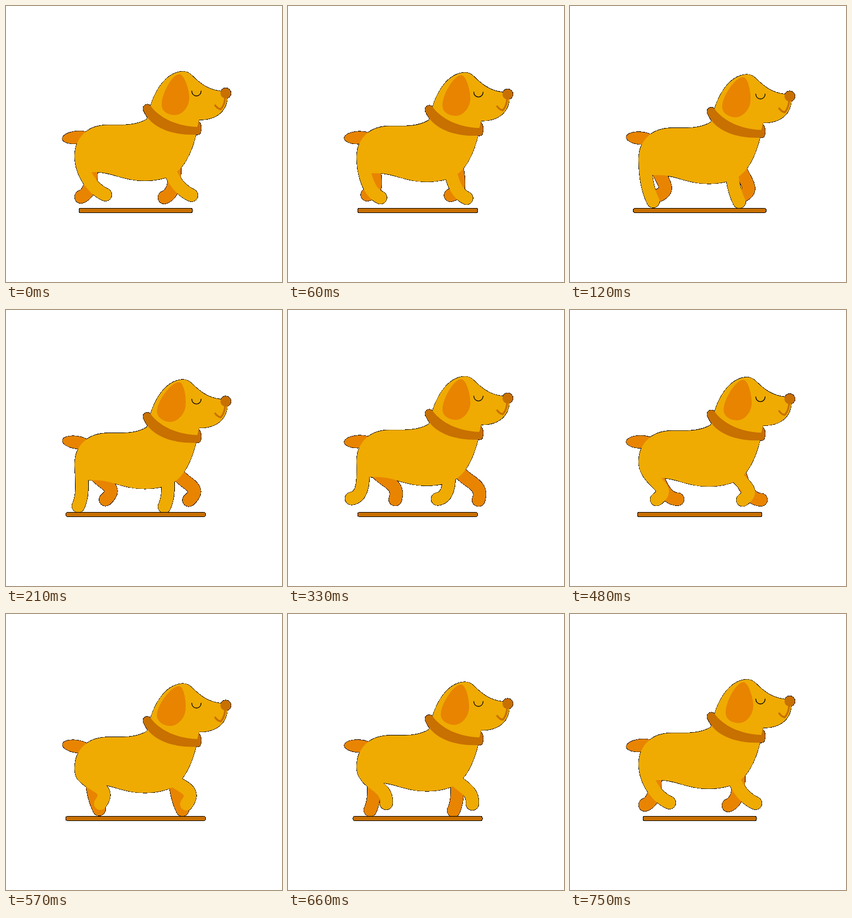
Write an HTML page that moves like this. It is 500 px wide and 500 px high and loops after 780 ms.

```html
<!DOCTYPE html>
<html lang="en">
<head>
<meta charset="utf-8">
<title>Walking dog</title>
<style>
  html, body { margin: 0; width: 100%; height: 100%; overflow: hidden; background: #fff; }
  svg { display: block; width: 100%; height: 100%; }
</style>
</head>
<body>
<svg id="stage" viewBox="0 0 500 500" fill="none" stroke-linecap="round" stroke-linejoin="round"></svg>
<script>
const STEP = 30, FRAMES = 26, CYCLE = 25;
const GOLD = '#efab02', ORANGE = '#e88400', BROWN = '#c87000', INK = '#000';
const EDGE = 0.7, LEG = 23;

const stage = document.getElementById('stage');

function set(el, attrs) {
  for (const k in attrs) el.setAttribute(k, attrs[k]);
  return el;
}

function add(parent, tag, attrs) {
  const el = document.createElementNS('http://www.w3.org/2000/svg', tag);
  parent.appendChild(el);
  return set(el, attrs);
}

// Dark copies lie under all the fills, so only the outer contour shows.
const edges = add(stage, 'g', { stroke: INK, fill: INK, 'shape-rendering': 'crispEdges' });
const fills = add(stage, 'g', {});

const solid = (tag, color, attrs) => [
  add(edges, tag, { ...attrs, 'stroke-width': 2 * EDGE }),
  add(fills, tag, { ...attrs, fill: color })
];

const tube = (color, width) => [
  add(edges, 'path', { fill: 'none', 'stroke-width': width + 2 * EDGE }),
  add(fills, 'path', { stroke: color, 'stroke-width': width })
];

const line = (width, color, d) => add(fills, 'path', { d, stroke: color, 'stroke-width': width });
const update = (els, attrs) => els.forEach(el => set(el, attrs));

const tail = solid('ellipse', ORANGE, { rx: 26, ry: 11.3 });

// Far pair first, then the near pair; each pair is hind and front.
const legs = [
  { x: 18, y: 0, lead: 10, color: ORANGE },
  { x: 169, y: 1, lead: 10, color: ORANGE },
  { x: 0, y: 0, lead: 0, color: GOLD },
  { x: 156, y: 1, lead: 0, color: GOLD }
].map(leg => ({ ...leg, els: tube(leg.color, LEG) }));

const body = solid('path', GOLD, {
  d: 'M320 118.5C294 120 274 144 262 180L255 205C245 211 232 215.5 208 215.5L185 215.5' +
     'C150 215.5 124.5 236 124.5 272C124.5 288 131 301 150 301L165 301' +
     'C195 302 212 316.5 252 316.5C272 316.5 290 312 302 306C322 294 336 268 345 230' +
     'L350 206C374 207 399 196 401 166L388 154C366 152 350 139 337 126C331 120 326 118.5 320 118.5Z'
});
const ear = add(fills, 'path', {
  fill: ORANGE,
  d: 'M314 123.5C301 123.5 281 160 282 180C283 192 294 197.5 306 197.5' +
     'C320 197.5 332 182 332 166C332 152 323 123.5 314 123.5Z'
});
const eye = line(1.3, INK, 'M336.5 154A8.5 9 0 0 0 353.5 154');
const mouth = line(3.4, BROWN, 'M397 167C396 177 392 184 389 187C384 186 381 183 379 180');
const nose = solid('circle', BROWN, { cx: 398, cy: 158, r: 9.5 });
const collar = solid('path', BROWN, {
  d: 'M250 191A7.5 7.5 0 0 1 262 181C278 203 310 218 347 219L349 209' +
     'C354 213 354.5 222 352.5 229Q351.5 233 347 233C308 235 264 224 250 191Z'
});
const riders = [...body, eye, mouth, ...nose, ...collar];

const bar = add(stage, 'rect', {
  y: 366.5, height: 8, rx: 3.5, fill: BROWN, stroke: INK, 'shape-rendering': 'crispEdges'
});

// The paw is pushed back over the ground, then swings forward with a bent ankle.
function legPath(f, hipY, dx, dy) {
  const PUSH = 10.3;
  const g = (f - 0.7 + CYCLE) % CYCLE;
  const push = g < PUSH;
  const u = push ? g / PUSH : (g - PUSH) / (CYCLE - PUSH);
  const arc = Math.sin(Math.PI * u);
  const reach = push ? 1 - u * (1.6 - 0.6 * u) : 1 - (1 - u) ** 2.5;
  const turn = push ? (1 + reach - u) / 2 : 0.45 * u + 0.55 * u ** 6;
  const angle = (8 + 177 * turn) * Math.PI / 180;
  const bend = 25 + (push ? 0 : 20 * arc * arc);
  const x = 115 + 65 * reach + dx;
  const y = 341.5 + (push ? 14.5 : 2) * arc + dy;
  const hip = 136 + dx, knee = 300 + (push ? 0 : 14 * arc) + dy;
  return `M${hip} ${hipY + dy}C${hip} ${knee} ` +
    `${x + bend * Math.cos(angle)} ${y - bend * Math.sin(angle)} ${x} ${y}`;
}

// Body drop: 0 at the top of a stride, 1 at the bottom.
function drop(f) {
  const turns = [0, 6.2, 13.2, 19.6, CYCLE];
  const i = turns.findIndex(t => t > f) - 1;
  const u = (f - turns[i]) / (turns[i + 1] - turns[i]);
  const s = u * u * (3 - 2 * u);
  return i % 2 ? 1 - s : s;
}

function draw(ms) {
  const f = Math.floor(ms / STEP) % FRAMES % CYCLE;
  const s = drop(f), y = 7.7 * s;
  update(riders, { transform: `translate(0 ${y})` });
  set(ear, { transform: `translate(0 ${y}) rotate(${9.5 * s} 315 124)` });
  update(tail, { transform: `translate(128 ${238 + 2 * s}) rotate(${15 * s - 6})` });
  for (const leg of legs) {
    update(leg.els, { d: legPath((f + leg.lead) % CYCLE, 271 + y, leg.x, leg.y) });
  }
  set(bar, { x: 132 - 24.3 * s, width: 206 + 48.6 * s });
}

const start = performance.now();
function tick() {
  draw(performance.now() - start);
  requestAnimationFrame(tick);
}
tick();
</script>
</body>
</html>
```
